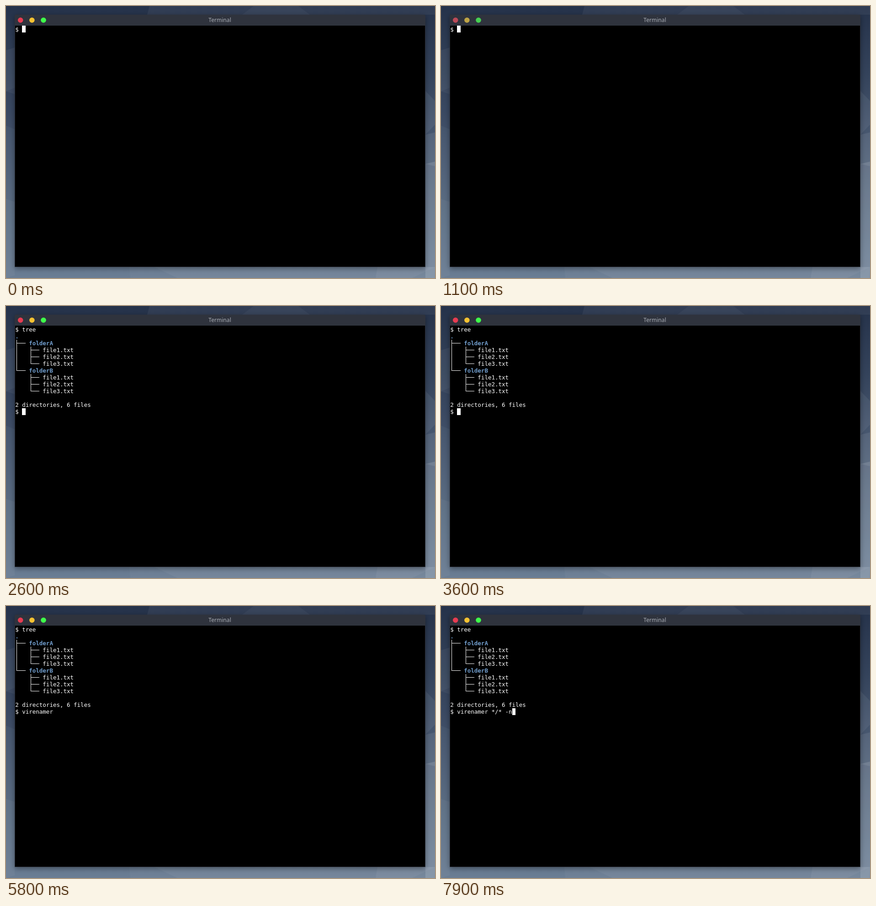
An HTML page with a canvas that plays this animation: 939x596 px, repeating every 8000 ms.

```html
<!DOCTYPE html>
<html lang="en">
<head>
<meta charset="utf-8">
<title>Terminal</title>
<style>
  html, body { margin: 0; width: 100%; height: 100%; overflow: hidden; background: #3c4a60; }
  canvas { display: block; }
</style>
</head>
<body>
<canvas id="stage" width="939" height="596"></canvas>
<script>
const ctx = document.getElementById('stage').getContext('2d');
const W = 939, H = 596, LOOP = 8000, TICK = 100;
const WIN = { x: 19, y: 19, w: 899, h: 553, bar: 24 };

// Terminal cells are laid out on a 9 x 18 grid, then scaled to the stage.
const CELL_W = 9, CELL_H = 18, SCALE = 0.836;
const ORIGIN = { x: 20.15, y: 43.45 };
const WHITE = '#ffffff', BLUE = '#729fcf';
const BLINK = 500;

// Bursts of keys; an empty burst is a key that prints nothing.
const KEYS = [
  { at: 0, text: '' },
  { at: 1500, text: 'tree', gap: 175 },
  { at: 2600, text: '\n', gap: 0 },
  { at: 3800, text: 'viren', gap: 175 },
  { at: 5000, text: 'amer ', gap: 0 },
  { at: 5300, text: '' },
  { at: 6100, text: '' },
  { at: 6400, text: '*/', gap: 100 },
  { at: 7000, text: '* ', gap: 200 },
  { at: 7600, text: '-n', gap: 300 }
];

const BUTTONS = [
  { on: [232, 60, 82], off: [188, 74, 88] },
  { on: [246, 194, 50], off: [190, 164, 70] },
  { on: [62, 252, 74], off: [70, 208, 82] }
];

function listTree() {
  const folders = ['A', 'B'], files = [1, 2, 3];
  const branch = (i, list) => (i === list.length - 1 ? '└── ' : '├── ');
  const lines = ['.'];
  folders.forEach((name, i) => {
    const indent = i === folders.length - 1 ? '    ' : '│   ';
    lines.push(branch(i, folders) + 'folder' + name);
    files.forEach((n, k) => lines.push(indent + branch(k, files) + `file${n}.txt`));
  });
  return [...lines, '', `${folders.length} directories, ${folders.length * files.length} files`];
}
const TREE = listTree();

// A slanted patch of wallpaper, visible along one edge of the stage.
function facet(side, from, to, lean, color) {
  const start = { top: 0, left: 0, right: WIN.x + WIN.w, bottom: WIN.y + WIN.h }[side];
  const end = { top: WIN.y, left: WIN.x, right: W, bottom: H }[side];
  const corners = [[from, start], [to, start], [to - lean, end], [from + lean, end]];
  const upright = side === 'left' || side === 'right';
  ctx.fillStyle = color;
  ctx.beginPath();
  corners.forEach(([along, across]) => (upright ? ctx.lineTo(across, along) : ctx.lineTo(along, across)));
  ctx.fill();
}

function drawBackground() {
  const sky = ctx.createLinearGradient(0, 0, 0, H);
  ['#25324a', '#34435b', '#4a5a72', '#5b6d83', '#6a7d94']
    .forEach((color, i, all) => sky.addColorStop(i / (all.length - 1), color));
  ctx.fillStyle = sky;
  ctx.fillRect(0, 0, W, H);

  const light = a => `rgba(255,255,255,${a})`;
  facet('top', 314, W, -5, light(0.05));
  facet('top', 542, 640, -25, light(0.035));
  facet('left', 97, 187, -6, light(0.05));
  facet('left', 187, 262, -8, 'rgba(16,28,58,.12)');
  facet('left', 423, H, 6, light(0.04));
  facet('right', 186, 282, 22, light(0.06));
  facet('right', 282, 346, -5, light(0.08));
  facet('right', 346, H, -5, light(0.13));
  facet('bottom', 270, W, 2, light(0.03));
  facet('bottom', 325, W, 50, light(0.04));
  facet('bottom', 813, W, -4, light(0.05));
}

function drawWindow() {
  ctx.save();
  ctx.shadowColor = 'rgba(0,0,0,.4)';
  ctx.shadowBlur = 12;
  ctx.shadowOffsetY = 3;
  ctx.fillStyle = '#2f333d';
  ctx.beginPath();
  ctx.roundRect(WIN.x, WIN.y, WIN.w, WIN.h, [3, 3, 0, 0]);
  ctx.fill();
  ctx.restore();

  const border = SCALE;
  ctx.fillStyle = '#000';
  ctx.fillRect(WIN.x + border, WIN.y + WIN.bar, WIN.w - 2 * border, WIN.h - WIN.bar - border);

  ctx.fillStyle = '#a9adb5';
  ctx.font = '12.1px "Noto Sans", sans-serif';
  ctx.textAlign = 'center';
  ctx.fillText('Terminal', 468, 35);
  ctx.textAlign = 'left';
}

// 1 while the window has focus, 0 while it does not.
function focusLevel(t) {
  if (t < 100 || t >= 1600) return 1;
  return t < 200 || t >= 1500 ? 0.5 : 0;
}

function drawButtons(focus) {
  BUTTONS.forEach(({ on, off }, i) => {
    const mixed = off.map((v, k) => Math.round(v + (on[k] - v) * focus));
    ctx.fillStyle = `rgb(${mixed})`;
    ctx.beginPath();
    ctx.arc(31.7 + i * 25.15, 31, 5.8, 0, Math.PI * 2);
    ctx.fill();
  });
}

const toX = units => Math.round(ORIGIN.x + units * SCALE);
const toY = units => Math.round(ORIGIN.y + units * SCALE);

function fillCellRect(x1, y1, x2, y2) {
  const left = toX(x1), top = toY(y1);
  ctx.fillRect(left, top, Math.max(1, toX(x2) - left), Math.max(1, toY(y2) - top));
}

function drawBoxChar(char, x, y) {
  const midX = x + 4, midY = y + 9, right = x + CELL_W;
  if (char !== '─') fillCellRect(midX, y, midX, char === '└' ? midY + 1 : y + CELL_H);
  if (char !== '│') fillCellRect(char === '─' ? x : midX, midY, right, midY);
}

function drawGlyph(char, x, y) {
  ctx.save();
  ctx.translate(ORIGIN.x, ORIGIN.y);
  ctx.scale(SCALE, SCALE);
  ctx.fillText(char, x, y + 14.5);
  ctx.restore();
}

function drawLine(text, row) {
  const name = text.search(/folder|^\.$/);
  [...text].forEach((char, col) => {
    const x = col * CELL_W, y = row * CELL_H;
    const isFolder = name >= 0 && col >= name;
    ctx.fillStyle = isFolder ? BLUE : WHITE;
    ctx.font = `${isFolder ? 'bold ' : ''}15px "DejaVu Sans Mono", monospace`;
    ('├└│─'.includes(char) ? drawBoxChar : drawGlyph)(char, x, y);
  });
}

function readKeys(t) {
  let typed = '', lastKey = 0;
  for (const { at, text, gap } of KEYS) {
    if (t < at) break;
    lastKey = at;
    [...text].forEach((char, i) => {
      if (t < at + i * gap) return;
      typed += char;
      lastKey = at + i * gap;
    });
  }
  return { typed, lastKey };
}

function drawTerminal(t) {
  const { typed, lastKey } = readKeys(t);
  const commands = typed.split('\n').map(command => '$ ' + command);
  const prompt = commands.pop();
  const lines = commands.length ? [...commands, ...TREE, prompt] : [prompt];
  lines.forEach(drawLine);

  if (Math.floor((t - lastKey) / BLINK) % 2 === 0) {
    const x = prompt.length * CELL_W, y = (lines.length - 1) * CELL_H;
    ctx.fillStyle = WHITE;
    fillCellRect(x, y, x + CELL_W, y + CELL_H);
  }
}

function render() {
  const t = Math.floor((performance.now() % LOOP) / TICK) * TICK;
  drawBackground();
  drawWindow();
  drawButtons(focusLevel(t));
  drawTerminal(t);
  requestAnimationFrame(render);
}
render();
</script>
</body>
</html>
```
